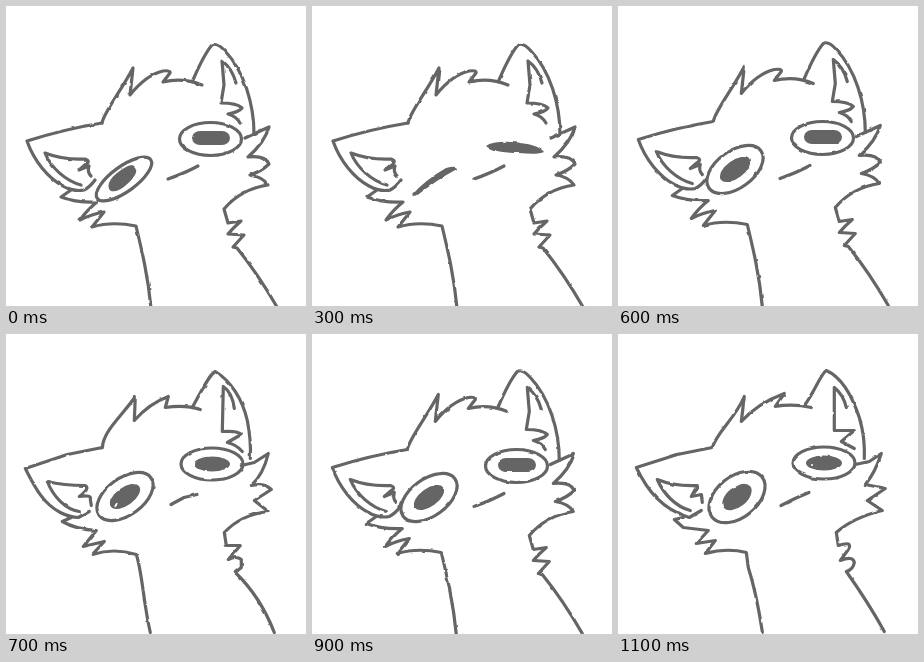
These frames come from a looping animation (300 px wide and 300 px high, 1.2 s). An HTML page:

```html
<!DOCTYPE html>
<html lang="en">
<head>
<meta charset="utf-8">
<title>Blinking cat</title>
<style>
  html, body { margin: 0; width: 100%; height: 100%; overflow: hidden; background: #fff; }
  /* Twelve drawings side by side, moved one stage width every 100 ms. */
  #strip {
    display: block; width: 1200vw; height: 100vh;
    fill: none; stroke: #656565; stroke-width: 3.2;
    stroke-linecap: round; stroke-linejoin: round;
    animation: run 1200ms steps(12) infinite;
  }
  .ink { fill: #656565; stroke: none; }
  .glint { fill: #fff; stroke: none; }
  @keyframes run { to { transform: translateX(-100%); } }
</style>
</head>
<body>
<svg id="strip" viewBox="0 0 3600 300" preserveAspectRatio="none">
  <defs>
    <!-- Slightly uneven pencil line -->
    <filter id="pencil" color-interpolation-filters="sRGB">
      <feTurbulence type="fractalNoise" baseFrequency=".12" seed="4"/>
      <feDisplacementMap in="SourceGraphic" scale="2.5" xChannelSelector="R" yChannelSelector="G"/>
    </filter>

    <!-- Three redrawings of the body, for the line wobble -->
    <g id="bodyA">
      <path d="M96 117Q59 123 21 135C28 155 42 172 57 180Q68 186 78 184Q84 181 89 174"/>
      <path d="M75 179C60 175 45 162 39 147Q57 154 79 153Q85 155 80 158L73 164L83 160Q81 166 85 170"/>
      <path d="M65 184L55 191Q71 197 91 196Q81 204 74 214Q86 208 98 206L86 221Q106 215 130 220C136 245 142 270 145 302"/>
      <path d="M96 117C98 106 115 85 127 62L124 89Q140 69 157 65Q165 64 164 67L157 76Q177 71 196 79"/>
      <path d="M187 74C193 60 200 46 206 39Q211 36 219 45C238 65 248 98 248 128"/>
      <path d="M230 77Q226 62 216 55L218 79L215 97Q231 97 236 102Q233 106 222 108Q230 110 234 117"/>
      <path d="M239 132L263 121C259 135 250 144 242 151Q259 149 263 158Q256 165 244 169Q257 171 262 179Q235 183 218 203L222 217L235 215Q227 222 222 228L238 229L227 241L231 242Q252 268 271 301"/>
    </g>
    <g id="bodyB">
      <path d="M97 115L62 122L20 136C28 151 36 170 55 180Q65 185 73 185L84 179"/>
      <path d="M74 179C60 177 48 164 42 149Q58 153 80 153Q85 156 74 164Q87 162 85 167L86 173"/>
      <path d="M66 185L57 189Q71 197 91 198L78 214L99 209L87 222Q109 215 131 222C137 240 138 270 145 300"/>
      <path d="M97 115C98 98 118 82 130 64L129 88Q144 71 163 64L160 75Q180 72 195 77"/>
      <path d="M187 75C195 61 203 43 210 39C225 48 237 66 242 88Q246 108 245 126"/>
      <path d="M229 76Q227 60 218 54L217 99Q233 98 236 102L222 110Q231 112 237 119"/>
      <path d="M236 133L249 130L263 121Q258 142 246 153Q259 150 266 157L249 168L263 179Q236 182 219 200L221 213L235 213L223 227Q231 223 236 227V235L230 240Q255 264 269 300"/>
    </g>
    <g id="bodyC">
      <path d="M95 115L60 122L19 135C30 158 45 177 72 185L84 178"/>
      <path d="M73 178C58 174 46 161 40 147Q57 154 80 153L74 164L84 162L85 170"/>
      <path d="M66 185L57 187L66 195L91 198L79 211L98 208L88 221Q110 215 129 220L131 235Q139 260 145 299"/>
      <path d="M95 115C100 99 118 86 127 64L124 89Q140 71 167 61L158 74Q176 71 194 75"/>
      <path d="M187 73C197 60 203 42 209 38C225 45 235 64 242 85Q248 105 247 126"/>
      <path d="M229 75Q226 62 217 55V98L237 98L224 109L237 116"/>
      <path d="M238 132L252 129L264 121Q258 140 248 152L268 156L250 168L265 178Q236 185 219 200L221 213Q236 208 231 217L223 228Q236 223 237 230Q236 237 229 239Q251 270 267 299"/>
    </g>

    <path id="mouthA" d="M162 173Q179 167 192 160"/>
    <path id="mouthB" d="M165 171L178 164L191 161"/>
    <path id="mouthC" d="M163 172L177 165L191 159"/>

    <g id="leftWide" transform="translate(119 163) rotate(-39)">
      <ellipse rx="32" ry="20.5"/>
      <ellipse class="ink" rx="17" ry="10"/>
    </g>
    <g id="leftOpen" transform="translate(118 162.500) rotate(-36)">
      <ellipse rx="32" ry="18.5"/>
      <ellipse class="ink" rx="17.5" ry="9"/>
    </g>
    <g id="leftHalf" transform="translate(118 173) rotate(-36)">
      <ellipse rx="33" ry="12.5"/>
      <path class="ink" d="M-18 1C-18 -6 -10 -9 0 -9S16 -8 16 -3Q16 4 0 6Q-14 8 -18 1Z"/>
    </g>
    <path id="leftLine" d="M98 191L141 160" stroke-width="5"/>
    <path id="leftShut" class="ink" d="M100 189Q113 174 134 162Q145 159 145 163Q126 173 103 191Z"/>

    <g id="rightWide">
      <ellipse cx="206" cy="130" rx="31" ry="16"/>
      <ellipse class="ink" cx="206" cy="130" rx="18" ry="7.5"/>
    </g>
    <g id="rightFlat">
      <ellipse cx="204.500" cy="133" rx="31" ry="16.5"/>
      <rect class="ink" x="186" y="125" width="38" height="14" rx="8" ry="7"/>
    </g>
    <g id="rightNarrow">
      <ellipse cx="205" cy="138" rx="31" ry="8.500"/>
      <path class="ink" d="M184 131Q203 127 220 131Q222 137 205 137Q190 137 184 131Z"/>
    </g>
    <path id="rightShut" class="ink" d="M174 140Q181 135 200 136Q226 138 232 146Q226 149 207 147Q182 147 174 140Z"/>

    <g id="half">
      <use href="#leftHalf"/><use href="#rightFlat"/>
    </g>
    <g id="closing">
      <use href="#leftLine"/><use href="#rightNarrow" x="1" y="1"/>
    </g>
    <g id="shut">
      <use href="#leftShut"/><use href="#rightShut"/>
    </g>
    <g id="opening">
      <use href="#leftWide" y="1"/><use href="#rightNarrow" y="-1"/>
    </g>
    <g id="openA">
      <use href="#leftOpen" x="-1" y="1"/><use href="#rightFlat" y="-1"/>
    </g>
    <g id="openB">
      <use href="#leftOpen" x="1"/><use href="#rightWide"/>
      <ellipse class="glint" cx="110" cy="171" rx="1" ry="2.5" transform="rotate(30 110 171)"/>
    </g>
    <g id="openC">
      <use href="#leftWide"/><use href="#rightWide" y="-1"/>
      <circle class="glint" cx="194" cy="131" r="1"/>
    </g>
  </defs>
  <g id="cats" filter="url(#pencil)"></g>
</svg>
<script>
  const cats = document.getElementById("cats");
  const eyes = ["half", "closing", "shut", "shut", "shut", "opening",
    "openA", "openB", "openC", "openA", "openB", "openC"];

  function place(id, x, y) {
    const use = document.createElementNS(cats.namespaceURI, "use");
    use.setAttribute("href", "#" + id);
    use.setAttribute("x", x);
    use.setAttribute("y", y);
    cats.append(use);
  }

  eyes.forEach((eye, i) => {
    const x = i * 300;
    const pose = "ABC"[i % 3];
    // The body sits a little higher while the eyes are open.
    const lift = i < 6 ? 0 : 1;
    place("body" + pose, x - lift * 0.7, -lift * 1.5);
    place("mouth" + pose, x, -lift * 0.5);
    place(eye, x, 0);
  });
</script>
</body>
</html>
```
